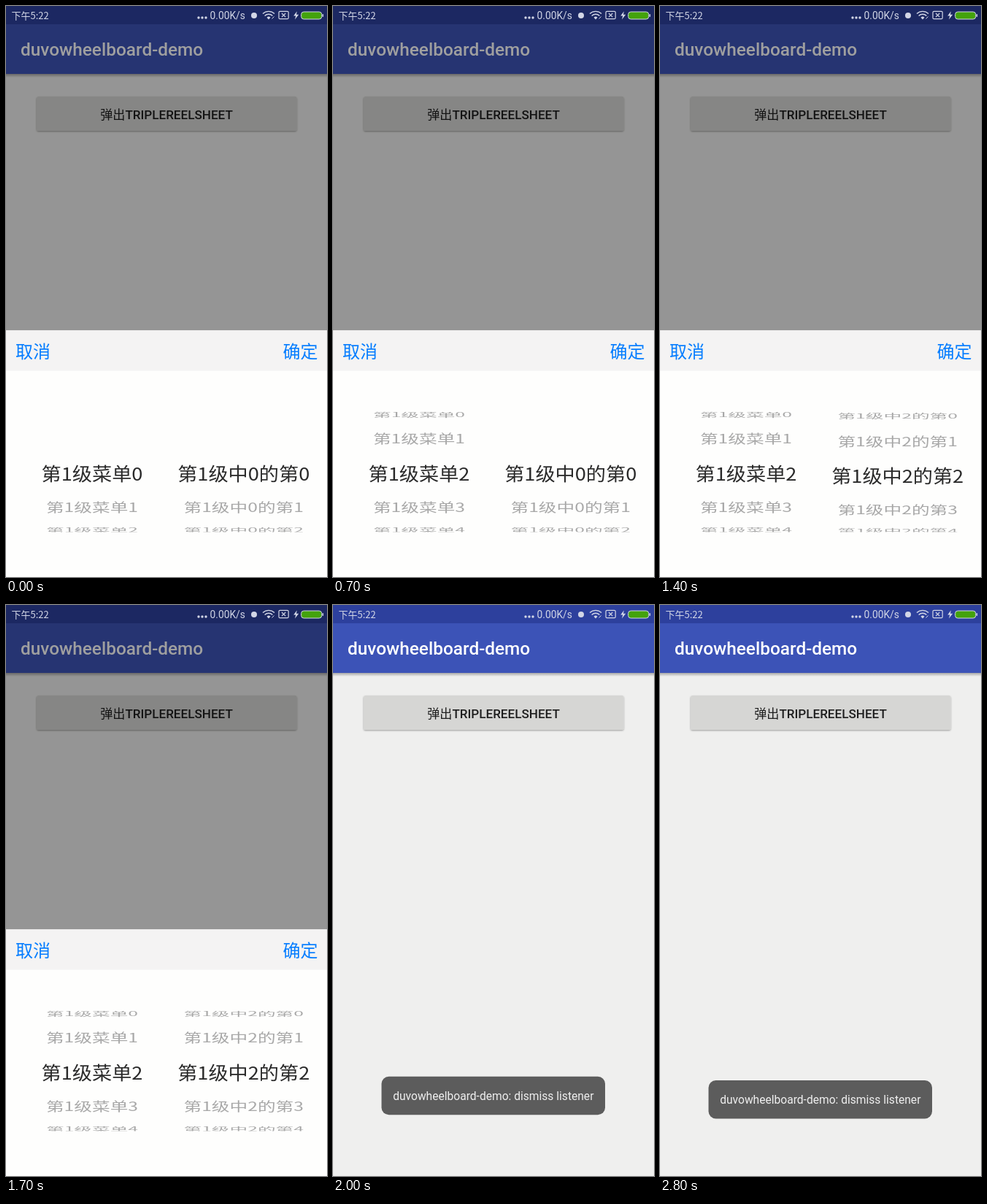
These frames come from a looping animation (440x782 px, 3400 ms). An HTML page:

```html
<!DOCTYPE html>
<html lang="zh-CN">
<head>
<meta charset="utf-8">
<title>Wheel menu</title>
<style>
  html, body { margin: 0; width: 100%; height: 100%; overflow: hidden; background: #efefee; }
  svg { display: block; width: 100%; height: 100%; }
  text { font-family: "Noto Sans CJK SC", "Noto Sans CJK", sans-serif; white-space: pre; }
  .latin { font-family: Roboto, sans-serif; }
  .medium { font-family: Roboto, sans-serif; font-weight: 500; }
  .mid { text-anchor: middle; }
  .wheel text { font-size: 24.7px; text-anchor: middle; }
  .action { font-size: 24px; fill: #057dff; }
</style>
</head>
<body>
<svg viewBox="0 0 440 782">
  <defs>
    <linearGradient id="shade" x2="0" y2="1">
      <stop offset="0" stop-opacity=".3"/>
      <stop offset="1" stop-opacity="0"/>
    </linearGradient>
    <filter id="soft" x="-5%" y="-20%" width="110%" height="150%">
      <feDropShadow dx="0" dy="1" stdDeviation="1" flood-opacity=".35"/>
    </filter>
    <clipPath id="view"><rect y="555.5" width="440" height="165"/></clipPath>
    <clipPath id="band"><rect y="616" width="440" height="48"/></clipPath>
    <clipPath id="outside"><path d="M0 500H440V616H0ZM0 664H440V782H0Z"/></clipPath>
  </defs>

  <rect width="440" height="782" fill="#efefee"/>
  <rect y="93" width="440" height="5" fill="url(#shade)"/>
  <rect width="440" height="93" fill="#3c53b7"/>
  <rect width="440" height="25" fill="#2d409d"/>
  <text class="medium" x="20" y="68" font-size="24.4" fill="#fff">duvowheelboard-demo</text>
  <rect x="42" y="124" width="356.5" height="47" rx="2.5" fill="#d6d6d4" filter="url(#soft)"/>
  <text class="mid" x="220" y="154.5" font-size="17.1" fill="#1e1e1e">弹出<tspan class="medium">TRIPLEREELSHEET</tspan></text>

  <rect id="dim" width="440" height="782" fill="#000" fill-opacity=".376"/>

  <g fill="#d2d6e6">
    <text x="7.5" y="17.8" font-size="13">下午5:22</text>
    <circle cx="264" cy="16" r="1.7"/><circle cx="269" cy="16" r="1.7"/><circle cx="274" cy="16" r="1.7"/>
    <text class="latin" x="279.5" y="18" font-size="13.8">0.00K/s</text>
    <circle cx="340" cy="13" r="4"/>
    <path d="M357.5 15.8a3.6 3.6 0 0 1 5 0L360 18.6Z"/>
    <g fill="none" stroke="#d2d6e6" stroke-width="1.4">
      <path d="M352 10.6a11.5 11.5 0 0 1 16 0M354.6 13.4a7.8 7.8 0 0 1 10.8 0"/>
      <path d="M364.5 17.5l3-3" stroke-width="1"/>
      <rect x="374" y="7.3" width="13.2" height="10.4" rx="1.5" stroke-width="1.2"/>
      <path d="M378 10l5.2 5.2M383.2 10L378 15.2" stroke-width="1.2"/>
    </g>
    <path d="M398.8 7.2L394.2 13.6H397.2L396 18.6L401.2 11.8H398Z"/>
    <rect x="404.7" y="8" width="28" height="10" rx="3.5" fill="#43a20c" stroke="#d2d6e6"/>
    <rect x="433.5" y="11" width="1.6" height="4" rx=".8"/>
  </g>

  <g id="panel">
    <rect y="444.3" width="440" height="338" fill="#fefefd"/>
    <rect y="444.3" width="440" height="55.3" fill="#f4f3f3"/>
    <text class="action" x="13" y="482">取消</text>
    <text class="action" x="427.5" y="482" text-anchor="end">确定</text>
    <g id="wheels" clip-path="url(#view)"></g>
  </g>

  <g id="toast">
    <rect x="66.5" width="306.5" height="52.5" rx="10" fill="#535353" fill-opacity=".94"/>
    <text class="latin mid" x="219.8" y="32" font-size="15.6" fill="#efefef">duvowheelboard-demo: dismiss listener</text>
  </g>
</svg>
<script>
const LOOP = 3400, STEP = 100;
const RADIUS = 87, ITEM_ANGLE = 32.5 * Math.PI / 180, CENTER = 638;
const BASELINE = 9.3, ROWS = 8;

// [time, value] steps; each value holds until the next one
const tracks = {
  left: [[0, 0], [100, .4], [200, .9], [300, 1.35], [400, 1.66], [500, 1.89], [600, 1.97], [700, 2]],
  right: [[0, 0], [1100, 1.5], [1200, 1.7], [1300, 1.84], [1400, 1.93], [1500, 1.98], [1600, 2]],
  group: [[0, 0], [900, 2]],
  slide: [[0, 0], [1800, 130], [1900, 271.7], [2000, 340]],
  dim: [[0, 1], [2000, 0]],
  toast: [[0, 0], [1900, 1]],
  toastY: [[0, 646.5], [2000, 645.8], [2100, 649], [2200, 651]]
};
const at = (track, t) => track.reduce((v, [time, value]) => t >= time ? value : v, 0);

const $ = id => document.getElementById(id);
const add = (parent, tag, attrs) => {
  const el = document.createElementNS(parent.namespaceURI, tag);
  for (const key in attrs) el.setAttribute(key, attrs[key]);
  return parent.appendChild(el);
};

function makeWheel(x, label) {
  const wheel = add($('wheels'), 'g', { class: 'wheel' });
  const layer = (clip, fill, sx, sy) => {
    const g = add(wheel, 'g', { 'clip-path': `url(#${clip})`, fill });
    return { sx, sy, rows: Array.from({ length: ROWS }, () => add(g, 'text', { y: BASELINE })) };
  };
  const layers = [layer('outside', '#a8a8a8', 1, .8), layer('band', '#2a2a2a', 1.1, 1)];

  return (pos, group) => {
    for (const { sx, sy, rows } of layers) rows.forEach((row, i) => {
      const angle = (i - pos) * ITEM_ANGLE, depth = Math.cos(angle);
      const visible = Math.abs(angle) < Math.PI / 2;
      row.setAttribute('display', visible ? 'inline' : 'none');
      if (!visible) return;
      const y = CENTER + RADIUS * Math.sin(angle) + 2.3 * depth;
      row.setAttribute('transform', `translate(${x} ${y}) scale(${sx} ${sy * depth})`);
      const text = label(i, group);
      if (row.textContent !== text) row.textContent = text;
    });
  };
}

const turnLeft = makeWheel(118, i => `第1级菜单${i}`);
const turnRight = makeWheel(325.7, (i, group) => `第1级中${group}的第${i}`);

function draw(t) {
  const now = name => at(tracks[name], t);
  turnLeft(now('left'));
  turnRight(now('right'), now('group'));
  $('panel').setAttribute('transform', `translate(0 ${now('slide')})`);
  $('dim').setAttribute('opacity', now('dim'));
  $('toast').setAttribute('opacity', now('toast'));
  $('toast').setAttribute('transform', `translate(0 ${now('toastY')})`);
}

const start = performance.now();
let shown = -1;
function tick() {
  const step = Math.floor((performance.now() - start) % LOOP / STEP);
  if (step !== shown) draw((shown = step) * STEP);
  requestAnimationFrame(tick);
}
tick();
</script>
</body>
</html>
```
